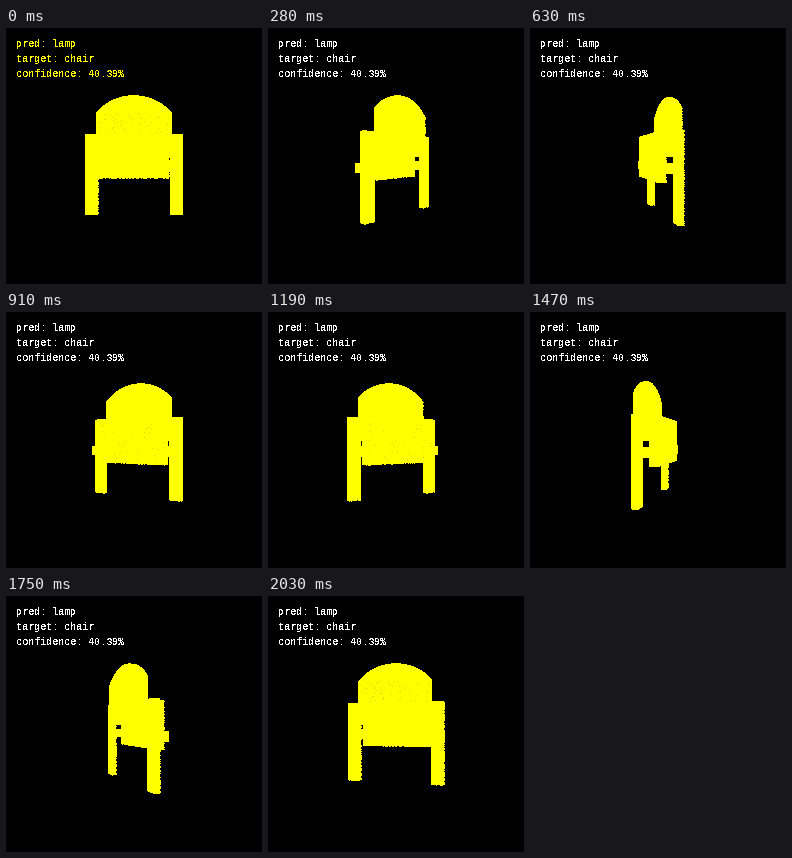
These frames come from a looping animation (256x256 px, 2100 ms). A matplotlib script:

```python
import numpy as np
import matplotlib.pyplot as plt
from matplotlib.animation import FuncAnimation
from matplotlib.collections import PolyCollection

SIZE, DPI = 256, 100
FRAMES, STEP_MS = 30, 70
CAMERA = 235
CENTER = 127.8, 127.8
YELLOW = "#ffff00"
rng = np.random.default_rng(4)
plt.rcParams.update({"text.antialiased": False, "text.hinting_factor": 1})


def rect(x0, x1, y0, y1):
    return np.array([(x0, y0), (x1, y0), (x1, y1), (x0, y1)], float)


def arched_back(half, top, shoulder, bottom, n=24):
    rise = shoulder - top
    r = (half**2 + rise**2) / (2 * rise)
    x = np.linspace(-half, half, n)
    y = top + r - np.sqrt(r**2 - x**2)
    return np.vstack([np.column_stack([x, y]), [(half, bottom), (-half, bottom)]])


# Each part is an outline in x, y extruded from z0 to z1.
PARTS = [
    (arched_back(35.7, -57.4, -41, 0.6), 7.4, 10.4),
    (rect(-35.5, 35.5, -20.7, 22.4), -10.6, -4.2),
]
for side in (-1, 1):
    PARTS.append((rect(side * 35.9, side * 46.9, -20.8, 56.7), 2.5, 7.3))
    PARTS.append((rect(side * 36, side * 42.5, 6.6, 14.9), -9.6, 4))


def at_depth(outline, z):
    return np.column_stack([outline, np.full(len(outline), z)])


def faces(outline, z0, z1):
    a, b = at_depth(outline, z0), at_depth(outline, z1)
    a2, b2 = np.roll(a, -1, 0), np.roll(b, -1, 0)
    return [a, b] + [np.array(q) for q in zip(a, a2, b2, b)]


def rim_points(outline, z0, z1, density=1.5):
    """Random points on the rim, giving the cloud its rough edge."""
    pts = []
    for p, q in zip(outline, np.roll(outline, -1, 0)):
        n = int(density * np.hypot(*(q - p))) + 1
        xy = p + rng.random((n, 1)) * (q - p)
        pts.append(np.column_stack([xy, rng.choice([z0, z1], n)]))
    return np.vstack(pts)


def speckle(n, half, y0, y1, z):
    return np.column_stack([rng.uniform(-half, half, n),
                            rng.uniform(y0, y1, n), np.full(n, z)])


FACES = [f for part in PARTS for f in faces(*part)]
RIM = np.vstack([rim_points(*part) for part in PARTS])
FRONT_SPECKS = speckle(60, 34, -43, -21, 10.4)
REAR_SPECKS = speckle(40, 34, -18, 21, -10.6)


def project(p, angle):
    c, s = np.cos(angle), np.sin(angle)
    x, y, z = p.T
    scale = CAMERA / (CAMERA + x * s - z * c)
    return np.column_stack([CENTER[0] + (x * c + z * s) * scale,
                            CENTER[1] + y * scale])


fig = plt.figure(figsize=(SIZE / DPI, SIZE / DPI), dpi=DPI, facecolor="black")
ax = fig.add_axes([0, 0, 1, 1])
ax.set_xlim(0, SIZE)
ax.set_ylim(SIZE, 0)
ax.axis("off")

solid = PolyCollection([], facecolors=YELLOW, edgecolors="none", antialiaseds=False)
ax.add_collection(solid)


def dots(color, px):
    return ax.plot([], [], "s", color=color, ms=px * 72 / DPI, mew=0)[0]


rim = dots(YELLOW, 1)
specks = dots("#dcdc00", 1)

LINES = ["pred: lamp", "target: chair", "confidence: 40.39%"]
labels = [ax.text(9.5, 19 + 15 * k, line, family="Liberation Mono", weight="bold",
                  size=10 * 72 / DPI, va="baseline")
          for k, line in enumerate(LINES)]


def draw(i):
    angle = 2 * np.pi * i / FRAMES
    solid.set_verts([project(f, angle) for f in FACES])
    rim.set_data(*project(RIM, angle).T)
    facing = np.cos(angle)
    shown = FRONT_SPECKS if facing > 0 else REAR_SPECKS
    specks.set_data(*project(shown, angle).T)
    specks.set_visible(abs(facing) > 0.8)
    for label in labels:
        label.set_color(YELLOW if i == 0 else "white")
    return [solid, rim, specks, *labels]


anim = FuncAnimation(fig, draw, frames=FRAMES, interval=STEP_MS, repeat=True)
plt.show()
```
